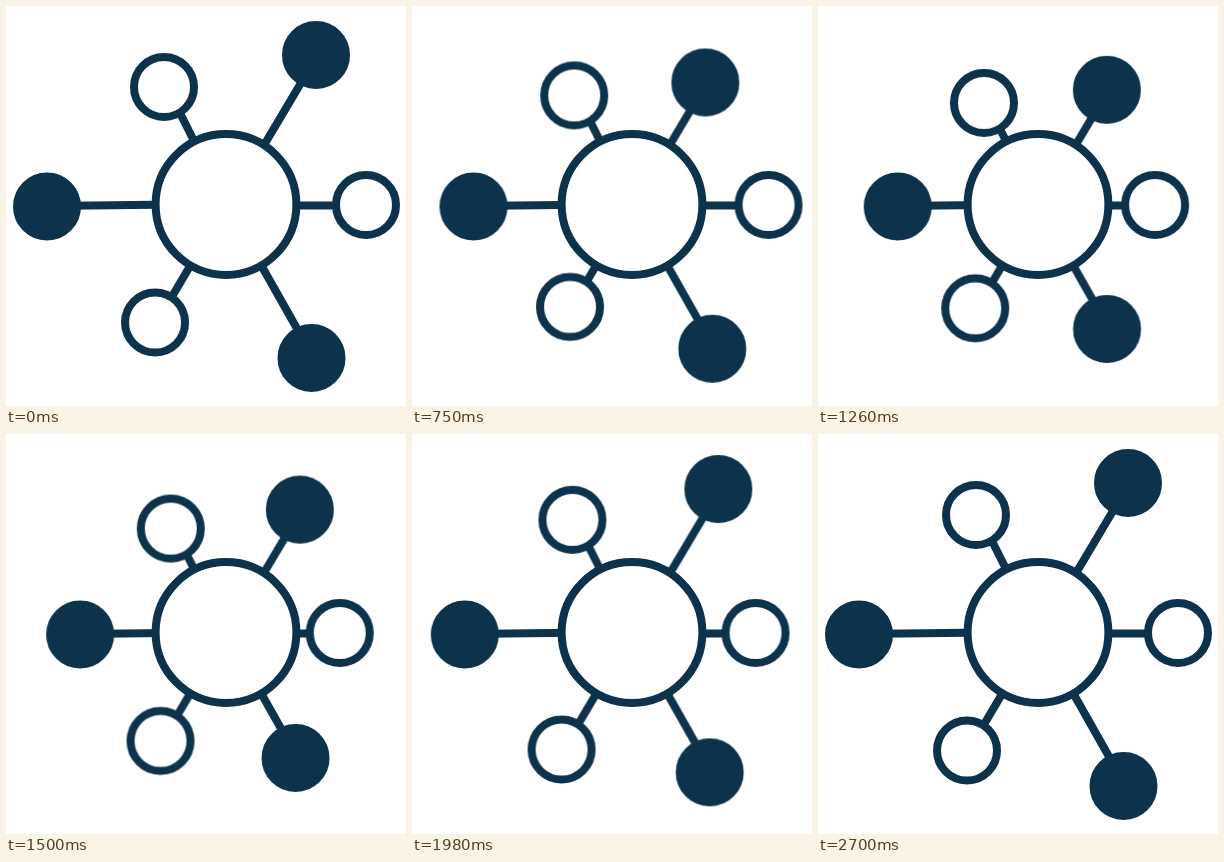
Write an HTML page that moves like this. It is 400 px wide and 400 px high and loops after 2730 ms.

```html
<!DOCTYPE html>
<html lang="en">
<head>
<meta charset="utf-8">
<title>Hub and nodes</title>
<style>
  html, body { margin: 0; width: 100%; height: 100%; overflow: hidden; background: #fff; }
  svg { display: block; width: 400px; height: 400px; }
  circle, line { stroke: #0d324b; stroke-width: 8; }
  circle { fill: #fff; }
  .solid { fill: #0d324b; }
</style>
</head>
<body>
<svg viewBox="0 0 400 400">
  <g id="nodes"></g>
  <circle cx="220" cy="198.5" r="70.4"/>
</svg>
<script>
const LOOP = 2730, PULL = 930, RELEASE = 1230;
const EASE = 'cubic-bezier(.333, 0, .667, 1)';

// at: centre, arm: line ends, by: inward travel, delay in ms
const nodes = [
  { at: [149, 316.5], arm: [150, 317.5, 200, 233], by: [10, -17.3], delay: 0 },
  { at: [310, 49], arm: [311, 50, 245, 161], by: [-22.7, 37.4], delay: 135, solid: true },
  { at: [41, 200.5], arm: [41, 200, 170, 198.6], by: [39, 0], delay: 270, solid: true },
  { at: [158, 81], arm: [160, 79, 200, 159], by: [8, 16], delay: 270 },
  { at: [305.5, 352], arm: [306.5, 350, 246, 243], by: [-16.8, -29.5], delay: 405, solid: true },
  { at: [360, 199], arm: [360, 199.5, 240, 199.5], by: [-26.3, 0], delay: 540 }
];

function add(parent, tag, attrs = {}) {
  const el = document.createElementNS('http://www.w3.org/2000/svg', tag);
  for (const key in attrs) el.setAttribute(key, attrs[key]);
  return parent.appendChild(el);
}

const root = document.getElementById('nodes');
const rest = 'translate(0px, 0px)';

for (const { at: [cx, cy], arm: [x1, y1, x2, y2], by, delay, solid } of nodes) {
  const g = add(root, 'g');
  add(g, 'line', { x1, y1, x2, y2 });
  add(g, 'circle', { cx, cy, r: 30, class: solid ? 'solid' : 'ring' });

  const step = (ms, transform) => ({ offset: ms / LOOP, transform, easing: EASE });
  g.animate([
    step(0, rest),
    step(delay, rest),
    step(delay + PULL, `translate(${by[0]}px, ${by[1]}px)`),
    step(delay + PULL + RELEASE, rest),
    step(LOOP, rest)
  ], { duration: LOOP, iterations: Infinity });
}
</script>
</body>
</html>
```
